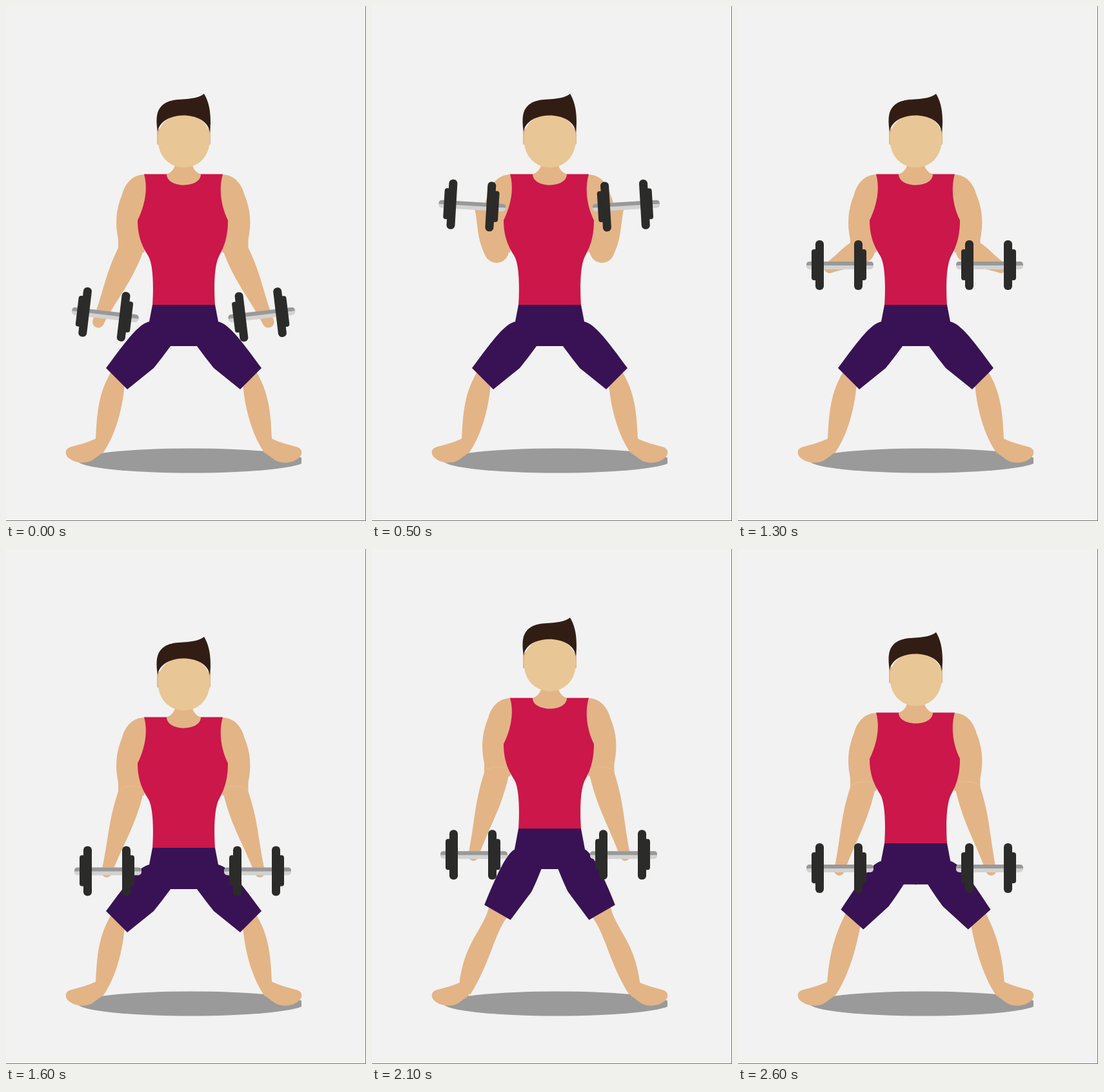
Animation of 558 by 798 pixels, one loop 2.7 s. Source, as an HTML page:

```html
<!DOCTYPE html>
<html lang="en">
<head>
<meta charset="utf-8">
<title>Squat and curl</title>
<style>
html, body { margin: 0; width: 100%; height: 100%; overflow: hidden; background: #f2f2f2; }
svg { display: block; width: 558px; height: 798px; }
.skin { fill: #e3b486; }
.cloth { fill: #391255; }
.iron { fill: #2b2b2a; }
</style>
</head>
<body>
<svg viewBox="0 0 558 798">
  <defs>
    <clipPath id="floor"><rect x="90" y="680" width="368" height="50"/></clipPath>
    <g id="bell">
      <rect x="-52" y="-6" width="104" height="12" rx="5" fill="#d2d2d2"/>
      <path d="M-52,0V-1Q-52,-6 -47,-6H47Q52,-6 52,-1V0Z" fill="#999"/>
      <g class="iron">
        <rect x="-44" y="-25" width="10" height="48" rx="4"/>
        <rect x="-38" y="-39" width="13" height="77" rx="6"/>
        <rect x="31" y="-25" width="10" height="48" rx="4"/>
        <rect x="22" y="-39" width="13" height="77" rx="6"/>
      </g>
    </g>
    <g id="leg" class="skin">
      <path id="shin"/>
      <path d="M140,670C127,676 113,680 101,683C90,686 91,696 98,701C110,710 126,709 135,703L150,692L152,680Z"/>
    </g>
    <path id="thigh" class="cloth"/>
    <g id="arm" class="skin">
      <path d="M217,261C196,260 184,276 180,292C170,316 169,338 174,362V382H214L226,330Z"/>
      <path id="forearm"/>
      <path id="crease" d="M175,373Q190,364 207,369" fill="none" stroke="#e8c195" stroke-width="1"/>
    </g>
  </defs>

  <rect width="558" height="798" fill="#f2f2f2"/>
  <ellipse cx="287" cy="704.5" rx="176" ry="19" fill="#9a9a9a" clip-path="url(#floor)"/>
  <use href="#leg"/>
  <use href="#leg" transform="matrix(-1 0 0 1 551 0)"/>

  <g class="body">
    <use href="#arm"/>
    <use href="#arm" transform="matrix(-1 0 0 1 549.5 0)"/>
    <path fill="#cb174a" d="M214,260.500H336C329,285 334,312 344,332C344,360 337,375 330,388C323,402 322,432 324,464H227C229,432 228,402 221,388C213,375 204,360 204,332C214,312 221,285 214,260.500Z"/>
  </g>

  <use href="#thigh"/>
  <use href="#thigh" transform="matrix(-1 0 0 1 551 0)"/>

  <g class="body">
    <path class="skin" d="M262,240H289V247C291,254 296,259 302,260.500C302,283 249,283 249,260.500C255,259 260,254 262,247Z"/>
    <rect class="skin" x="234" y="190" width="83" height="25" rx="2"/>
    <path fill="#e8c696" d="M235.500,206C235.500,155 316,155 316,206C316,265 235.500,265 235.500,206Z"/>
    <path fill="#321d14" d="M235,195C231,170 235,158 246,151C264,140 290,149 307,136C315,149 319,168 316,196C312,161 239,161 235,195Z"/>
    <use id="bellL" href="#bell"/>
    <use id="bellR" href="#bell"/>
  </g>

  <path d="M557.500,0V798M0,797.500H558" stroke="#777" fill="none"/>
</svg>
<script>
const LOOP = 2700, STEP = 100;
const $ = id => document.getElementById(id);
const bodies = document.querySelectorAll('.body');

// time, dumbbell y, tilt, outward shift, hand x, hand y offset from dumbbell, hand radius
const KEYS = [
  [1800, 504, 0, 0, 157, 1, 8],
  [2500, 504, 0, 0, 157, 1, 8],
  [2600, 502, 0, 0, 157, 3, 8],
  [2700, 478.5, 6.8, 4.2, 143, 11, 9],
  [3000, 365.5, 6.8, 5.3, 172, 8, 5],
  [3400, 280, 0, 0, 157, -5, 8],
  [3600, 279, 0, 0, 156, -5, 8],
  [4000, 402, 0, 0, 142, 3, 9],
  [4355, 504, 0, 0, 157, 1, 8],
  [4600, 504, 0, 0, 157, 1, 8]
];

// leg outlines: deep squat and raised stance
const SHIN = [
  'M164,565C143,600 141,630 139,671L150,693C166,670 180,633 184,585Z',
  'M181,552C172,590 144,608 136,671L152,691C183,642 189,597 209,570Z'
];
const THIGH = [
  'M227,463L222,489C205,493 187,518 155,561L188,594L229,561Q242,545 255,527H277V463Z',
  'M227,435L221,467C208,474 193,505 173,552L213,576L246,533Q253,520 262,498H277V435Z'
];

function mix([a, b], k) {
  const to = b.match(/\d+/g);
  let i = 0;
  return a.replace(/\d+/g, n => (+n + (to[i++] - n) * k).toFixed(2));
}

// monotone cubic through one column of KEYS
function track(t, col) {
  let i = 0;
  while (i < KEYS.length - 2 && t >= KEYS[i + 1][0]) i++;
  const slope = j => KEYS[j + 1] && KEYS[j]
    ? (KEYS[j + 1][col] - KEYS[j][col]) / (KEYS[j + 1][0] - KEYS[j][0]) : 0;
  const tangent = j => {
    const p = slope(j - 1), q = slope(j);
    return p * q <= 0 ? 0 : 2 * p * q / (p + q);
  };
  const [a, b] = [KEYS[i], KEYS[i + 1]];
  const d = b[0] - a[0], u = (t - a[0]) / d, v = 1 - u;
  return a[col] * v * v * (1 + 2 * u) + b[col] * u * u * (3 - 2 * u)
    + d * u * v * (tangent(i) * v - tangent(i + 1) * u);
}

function wave(t, from, to) {
  const u = Math.min(1, Math.max(0, (t - from) / (to - from)));
  return (1 - Math.cos(Math.PI * u)) / 2;
}

function limb(x, y, hx, hy, r) {
  const len = Math.hypot(hx - x, hy - y);
  const a = Math.atan2(hy - y, hx - x) * 180 / Math.PI;
  const c = len * 0.4, e = len * 0.6;
  $('forearm').setAttribute('d',
    `M0,-19C${c},-21 ${e},-12 ${len},${-r}A${r},${r} 0 0 1 ${len},${r}C${e},12 ${c},21 0,19A19,19 0 0 1 0,-19Z`);
  $('forearm').setAttribute('transform', `translate(${x} ${y}) rotate(${a})`);
}

function draw(t) {
  const rise = 32 * (wave(t, 1600, 2200) - wave(t, 2300, 2735)) * (t > 0);
  const k = rise / 28;
  bodies.forEach(g => g.setAttribute('transform', `translate(0 ${-rise})`));
  $('shin').setAttribute('d', mix(SHIN, k));
  $('thigh').setAttribute('d', mix(THIGH, k));

  const s = t < 1900 ? t + LOOP : t;
  const [y, tilt, shift, hx, off, r] = [1, 2, 3, 4, 5, 6].map(c => track(s, c));
  limb(193, 379, hx, y + off, r);
  $('crease').setAttribute('opacity', y > 495 ? 1 : 0);
  $('bellL').setAttribute('transform', `translate(${158 - shift} ${y}) rotate(${tilt})`);
  $('bellR').setAttribute('transform', `translate(${390 + shift * 1.5} ${y}) rotate(${-tilt})`);
}

function tick() {
  const t = performance.now() % LOOP;
  draw(Math.floor(t / STEP) * STEP);
  requestAnimationFrame(tick);
}
tick();
</script>
</body>
</html>
```
